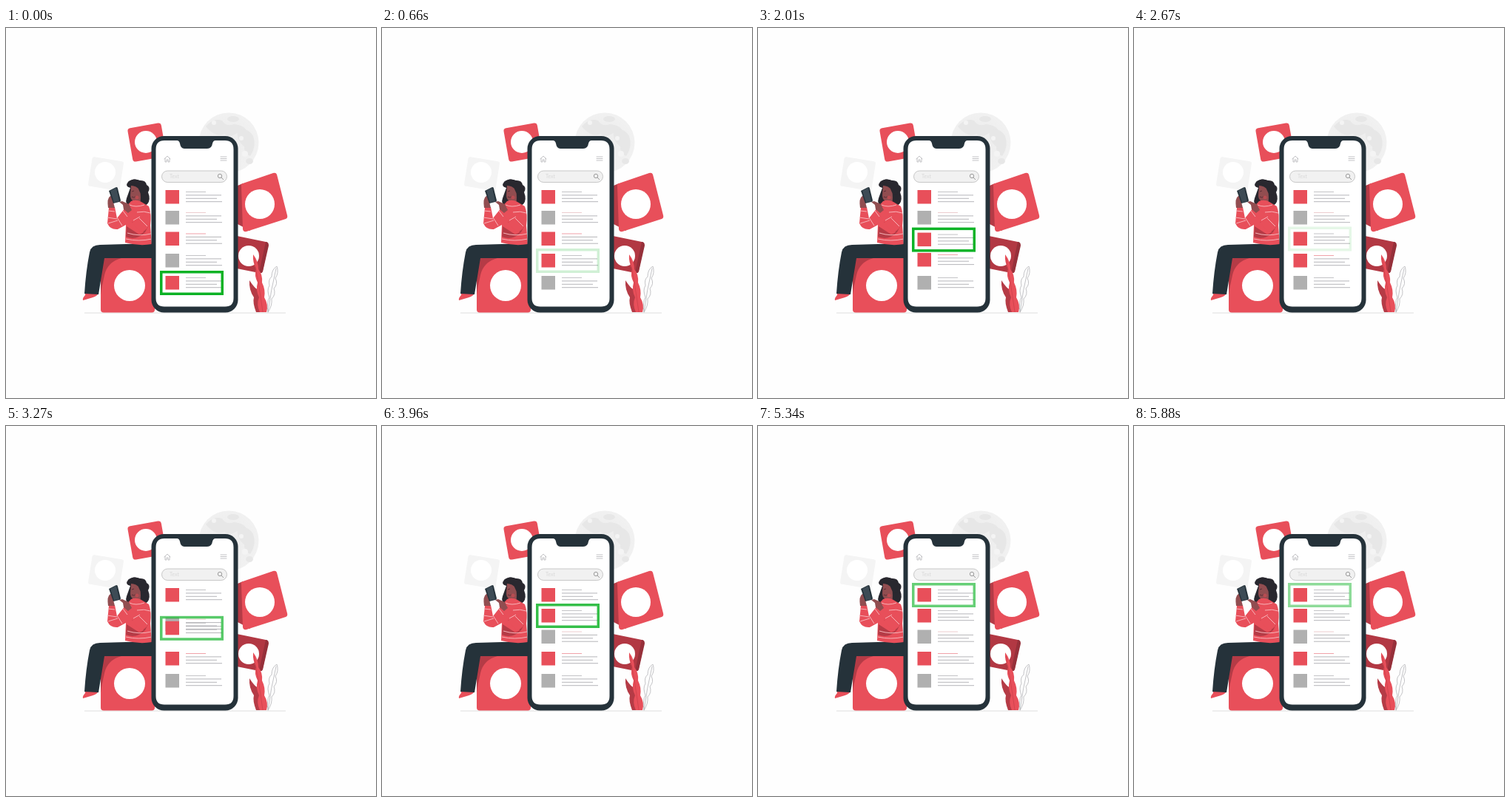
These frames come from a looping animation (500 px wide and 500 px high, 5.91 s). An HTML page:

```html
<!DOCTYPE html>
<html lang="en">
<head>
<meta charset="utf-8">
<title>Browser list</title>
<style>
  html, body { margin: 0; width: 100%; height: 100%; overflow: hidden; background: #fefefe; }
  svg { display: block; width: 100vw; height: 100vh; }
  .red { fill: #e84f5a; }
  .dark { fill: #b53b46; }
  .ink { fill: #25323a; }
  .hair { fill: #29282f; }
  .skin { fill: #914d50; }
  .mark { fill: #fff; }
  .thin { fill: none; stroke: #b4b4b8; stroke-width: .8; stroke-linecap: round; }
  .stripe { fill: none; stroke: #f7b4b9; stroke-width: 1; }
  text { font: 7px Lato, sans-serif; fill: #d9d9d9; }
</style>
</head>
<body>
<svg viewBox="0 0 500 500">
  <defs>
    <radialGradient id="moonTone" cx=".45" cy=".5" r=".55">
      <stop offset="0" stop-color="#ececec"/>
      <stop offset="1" stop-color="#f1f1f1"/>
    </radialGradient>
  </defs>

  <g id="moon">
    <circle cx="301" cy="155" r="40.500" fill="url(#moonTone)"/>
    <g fill="#e7e7e7">
      <path d="M270 133q10-12 22-8q5 9 16 5q15 1 19 12q-9 4-15 0q-9 7-17 1q-12 6-25-10z"/>
      <path d="M313 138q14-4 21 8q5 14-4 27q-9-4-8-13q-11-8-9-22z"/>
      <ellipse cx="307" cy="123" rx="8" ry="4"/>
      <ellipse cx="329" cy="180" rx="5" ry="4"/>
    </g>
    <g fill="#f4f4f4">
      <circle cx="281" cy="128" r="3"/>
      <circle cx="318" cy="149" r="3"/>
      <circle cx="323" cy="170" r="4"/>
    </g>
  </g>

  <path d="M106 385H378" stroke="#dedede"/>

  <g id="tiles">
    <rect class="red" x="-23" y="-23" width="46" height="46" rx="4" transform="translate(190.5 154.5) rotate(-10)"/>
    <circle class="mark" cx="189" cy="154" r="15"/>

    <rect x="-21.5" y="-20" width="43" height="40" rx="3" fill="#f4f4f4" transform="translate(135 197) rotate(9)"/>
    <circle class="mark" cx="134" cy="195" r="14"/>

    <path class="dark" d="M313 213L320 210L330 274L313 265Z"/>
    <path class="red" d="M318 214Q317 211 320 210L361 196Q365 195 366 198L380 253Q381 257 378 258L325 275Q321 276 320 272Z"/>
    <circle class="mark" cx="343" cy="238" r="20"/>

    <path fill="#b23843" d="M312 281L351 289Q355 290 354 294L347 328Q346 332 342 331L312 325Z"/>
    <path fill="#96303a" d="M351 289Q355 289 355 294L347 329Q346 332 342 331Z"/>
    <circle class="mark" cx="328" cy="308" r="14"/>

    <rect class="red" x="128" y="310" width="73" height="74.500" rx="4"/>
    <path class="dark" d="M128 311H156Q137 316 133 334T128 360Z"/>
    <circle class="mark" cx="167" cy="348" r="21"/>
  </g>

  <g id="plants">
    <path class="dark" d="M329 341Q336 352 341 354Q348 366 347 384H338Q333 371 335 364Q328 354 329 341Z"/>
    <path class="red" d="M334 306Q341 315 341 326Q347 333 346 344Q351 354 349 364Q355 374 352 384H343Q338 373 342 364Q337 354 340 344Q335 334 338 326Q333 316 334 306Z"/>
    <path d="M335 311Q341 340 347 384" fill="none" stroke="#c93f4a" stroke-width=".7"/>
    <path class="thin" d="M354 384Q352 370 356 364Q352 354 356 348Q354 340 359 336Q359 326 366 322Q369 331 364 338Q368 346 362 352Q365 360 359 366Q360 375 354 384Q358 354 365 325"/>
  </g>

  <g id="woman">
    <path class="red" d="M107 357L125 358Q124 362 116 364.500L104 368Q103 365 107 361Z"/>
    <path class="ink" d="M197 291V311H133L125 360L106 359Q108 328 113 303Q115 293 127 293Z"/>
    <path class="hair" d="M165 208Q172 202 180 206Q189 205 190 212Q196 215 192 222Q196 232 191 238Q184 243 176 237L168 240Q160 238 163 230L168 216Q160 214 165 208Z"/>
    <path class="skin" d="M169 213Q176 213 181 219Q183 230 181 238H171V233Q168 231 168 226Z"/>
    <path class="hair" d="M165 208Q172 209 178 214Q180 222 184 226Q190 226 190 216L181 206Q172 202 165 208Z"/>
    <path d="M170 221L173 220M170 228Q173 230 175 228" fill="none" stroke="#4d2931" stroke-width=".8"/>
    <circle cx="177" cy="229" r="2.500" fill="#b84c52"/>
    <path class="red" d="M169 234Q176 231 183 235L193 241Q197 251 195 267L197 292Q180 295 161 290L162 266L151 272Q141 273 137 264L139 243L147 242L150 257L161 243Z"/>
    <path class="dark" d="M170 262L185 271Q189 276 180 279L163 268L162 282Q176 288 188 276L193 266L187 257Z"/>
    <path class="red" d="M164 250L171 246L182 258L188 250L195 261Q192 273 183 276Q174 270 164 250Z"/>
    <path class="stripe" d="M138 247l9 1M137 256l13 2M138 264l13-4M150 256l7 11M158 247l6 8M167 239q8 4 20 0M177 249q10-2 18 1M180 257l11 11M164 277q16 5 32 1M162 285q17 4 35 0M172 260l9-5"/>
    <path class="skin" d="M138 243Q136 230 141 227L147 226L148 231L145 235L147 243Z"/>
    <path class="skin" d="M165 250L170 246L166 238L157 234L153 235L158 239L159 245Z"/>
    <path class="ink" d="M139 220L149 215Q151 215 151 217L155 233Q155 235 153 235L145 237Z"/>
    <path d="M141 220L149 216L153 234L146 236Z" fill="#3d4b55"/>
  </g>

  <g id="phone">
    <rect class="ink" x="196.500" y="146" width="117" height="238.500" rx="17"/>
    <path d="M214 152H231Q234 152 235 156Q236 163 241 163H272Q278 163 279 156Q280 152 283 152H296Q307.500 152 307.500 164V365Q307.500 376.500 296 376.500H214Q202.500 376.500 202.500 365V164Q202.500 152 214 152Z" fill="#fff"/>
    <path class="thin" d="M214 177l4-4l4 4M215 176v5h2v-3h2v3h2v-5M290 174h8M290 176.500h8M290 179h8"/>
    <rect x="210.500" y="193" width="88" height="15.500" rx="7.750" fill="#f1f1f1" stroke="#bbb" stroke-width=".8"/>
    <text x="221" y="203">Text</text>
    <g fill="none" stroke="#888" stroke-width=".8"><circle cx="289" cy="200" r="2.700"/><path d="M291 202l3 3"/></g>
  </g>

  <g id="rows"></g>
  <rect id="frame" x="209.750" y="-14.250" width="82.500" height="29.500" fill="none" stroke="#0bb224" stroke-width="3.500"/>
</svg>
<script>
  const LOOP = 5910, STEP = LOOP / 4, MOVE = 675, BLINK = 1025;
  const slots = [228, 256, 284.5, 314, 344];
  const RED = '#e84f5a', GREY = '#b0b0b0';
  const fills = [RED, GREY, RED, GREY, RED];
  const tops = ['#b4b4b8', '#e7bfc2', '#ec8a92', '#b4b4b8', '#b4b4b8'];
  const frame = document.getElementById('frame');
  const list = document.getElementById('rows');

  function add(parent, tag, attrs) {
    const el = document.createElementNS('http://www.w3.org/2000/svg', tag);
    for (const key in attrs) el.setAttribute(key, attrs[key]);
    return parent.appendChild(el);
  }

  const rows = fills.map((fill, i) => {
    const row = add(list, 'g', {});
    add(row, 'rect', { x: 215.5, y: -9, width: 18.5, height: 18.5, fill });
    [270, 291, 285, 292].forEach((end, n) => add(row, 'path', {
      d: `M243 ${-6.5 + n * 4.4}H${end}`,
      stroke: n ? '#a2a2a8' : tops[i],
      'stroke-width': .8
    }));
    return row;
  });

  const ease = p => p < .5 ? 4 * p ** 3 : 1 - 4 * (1 - p) ** 3;
  const place = (el, y) => el.setAttribute('transform', `translate(0 ${y})`);

  // The last row climbs one slot per step; each row it passes drops one slot.
  function draw() {
    const t = performance.now() % LOOP;
    let heroY = slots[4];
    for (let step = 0; step < 4; step++) {
      const i = 3 - step;
      const p = ease(Math.min(1, Math.max(0, (t - step * STEP) / MOVE)));
      const shift = (slots[i + 1] - slots[i]) * p;
      place(rows[i], slots[i] + shift);
      heroY -= shift;
    }
    place(rows[4], heroY);
    place(frame, heroY);
    frame.setAttribute('opacity', (1 + Math.cos(2 * Math.PI * t / BLINK)) / 2);
    requestAnimationFrame(draw);
  }
  draw();
</script>
</body>
</html>
```
